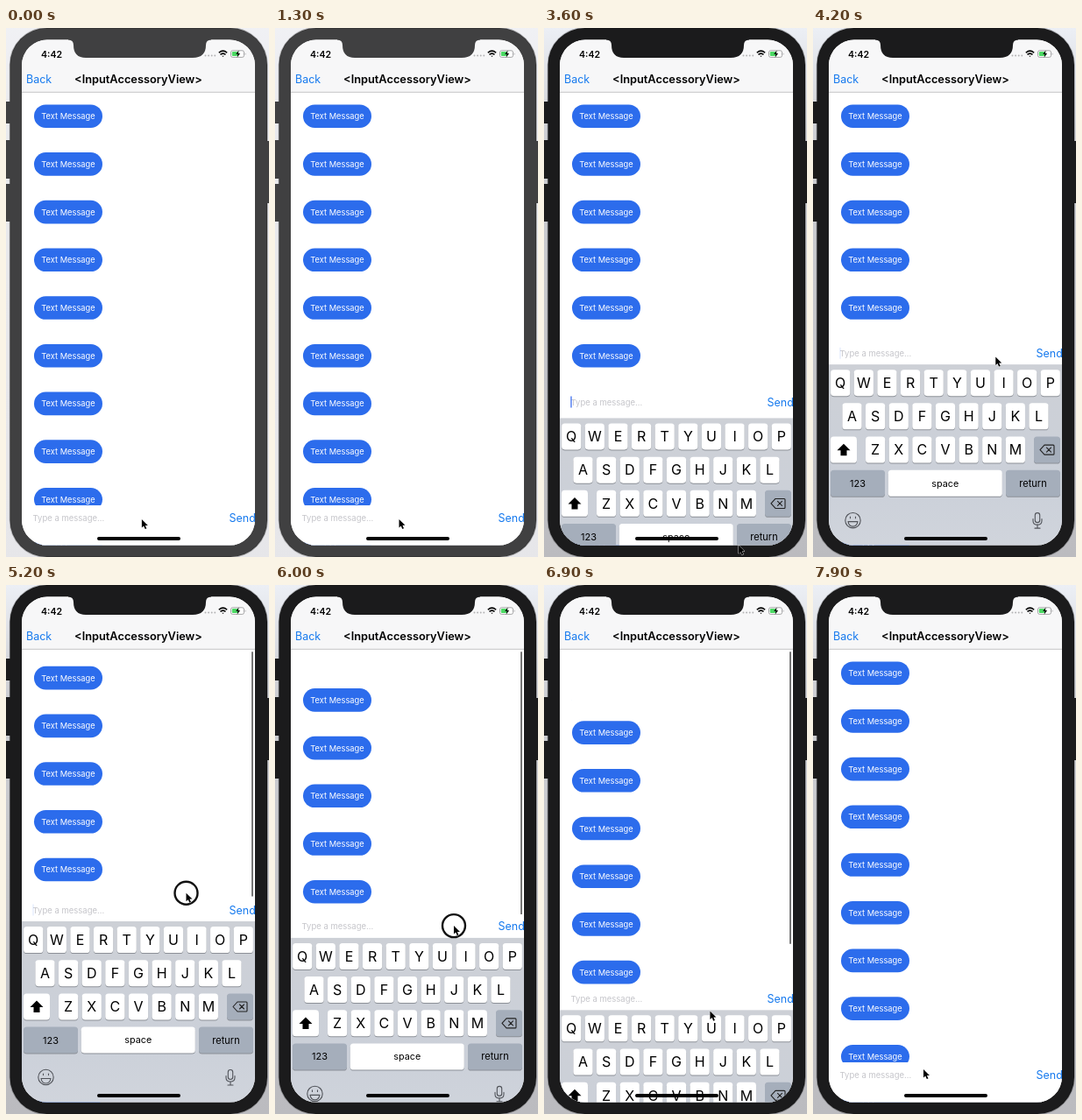
These frames come from a looping animation (300x604 px, 8 s). An HTML page:

```html
<!DOCTYPE html>
<html lang="en">
<head>
<meta charset="utf-8">
<title>Input accessory view</title>
<style>
  html, body { margin: 0; width: 100%; height: 100%; overflow: hidden; background: #eee; }
  svg { display: block; width: 300px; height: 604px; font-family: Inter, sans-serif; }
  .mid { text-anchor: middle; }
  .blue { fill: #1579ee; font-size: 12.5px; }
  .bold { font-weight: 600; }
  .line { fill: none; stroke: #505359; stroke-width: 1.1; stroke-linecap: round; stroke-linejoin: round; }
</style>
</head>
<body>
<svg viewBox="0 0 300 604">
  <defs>
    <clipPath id="screen"><rect x="18" y="13.6" width="266" height="577" rx="29"/></clipPath>
    <linearGradient id="shade" x2="0" y2="1">
      <stop stop-color="#eceff5"/><stop offset=".2" stop-color="#cfd0d4"/><stop offset="1" stop-color="#bbbbbf"/>
    </linearGradient>
    <linearGradient id="board" x2="0" y2="1">
      <stop stop-color="#cdd0d6"/><stop offset=".6" stop-color="#cbd0d9"/><stop offset="1" stop-color="#d2d6dd"/>
    </linearGradient>
  </defs>
  <rect width="300" height="604" fill="#f1f1f4"/>
  <rect id="shadow" width="300" height="604" fill="url(#shade)"/>
  <g id="phone">
    <rect x="4.5" width="293.5" height="604" rx="42" stroke="#000" stroke-opacity=".25" stroke-width="1.5"/>
    <path d="M0 84h6v25H0zM0 128h6v44H0zM0 178h6v43H0zM296 129h4v71h-4z"/>
  </g>
  <g clip-path="url(#screen)">
    <rect x="18" y="13" width="266" height="578" fill="#fff"/>
    <g id="messages"></g>
    <rect id="scrollbar" x="280" y="76" width="2" rx="1" fill="#757575"/>
    <path d="M18 13h266v60H18z" fill="#f7f7f8"/>
    <path d="M18 73.3h266" stroke="#b5b5b8" stroke-width=".8"/>
    <g id="bar">
      <path d="M18-14h266v90H18z" fill="#fff"/>
      <text x="30.5" y="3.5" font-size="9.5" fill="#c5c5ca">Type a message...</text>
      <text x="254.5" y="4.5" class="blue">Send</text>
      <path id="caret" d="M31-6.5V6.5" stroke="#3d6ff0" stroke-width="1.3"/>
    </g>
    <g id="keyboard">
      <rect x="18" width="266" height="230" fill="url(#board)"/>
    </g>
    <text x="23" y="63" class="blue">Back</text>
    <text x="151" y="63" class="mid bold" font-size="12.8">&lt;InputAccessoryView&gt;</text>
    <text x="40" y="33.5" class="bold" font-size="10.6">4:42</text>
    <path d="M227.5 31.5h12" stroke="#b4b4b6" stroke-width="2" stroke-linecap="round" stroke-dasharray="0 3.6"/>
    <path d="M242.8 28.2q4.7-4.2 9.4 0M244.5 30.4q3-2.6 6 0" fill="none" stroke="#000" stroke-width="1.5"/>
    <path d="M246.3 31.8h2.4l-1.2 1.3z"/>
    <rect x="256.5" y="25.8" width="15" height="7.6" rx="2" fill="#fff" stroke="#8e8e90" stroke-width=".8"/>
    <rect x="257.8" y="27.1" width="7.5" height="5" rx="1" fill="#4cd964"/>
    <path d="M272.8 28.2q1.6 1.4 0 2.8z" fill="#8e8e90"/>
    <path d="M265.5 25.5l-3.3 4.6h2.2l-.8 3.6 3.5-4.7h-2.2z"/>
  </g>
  <path id="notch" d="M71 12v1.6q6 0 6 6 0 14.4 14 14.4h122q15 0 15-14.4 0-6 6-6V12z"/>
  <path d="M106 583h91" stroke="#000" stroke-width="4" stroke-linecap="round"/>
  <g id="pointer">
    <circle id="touch" r="13" fill="#fff" fill-opacity=".4" stroke="#111" stroke-width="2.4"/>
    <path d="M0 0v9.5l2.2-2 1.6 3.6 1.7-.7-1.6-3.5h3.1z" stroke="#fff" stroke-width=".8" paint-order="stroke"/>
  </g>
</svg>
<script>
const $ = id => document.getElementById(id);
const add = (id, markup) => $(id).insertAdjacentHTML('beforeend', markup);
const set = (id, name, value) => $(id).setAttribute(name, value);
const move = (id, x, y) => set(id, 'transform', `translate(${x} ${y})`);
const clamp = v => Math.max(0, Math.min(1, v));
const ramp = (t, from, to) => clamp((t - from) / (to - from));
const ease = (t, from, to) => (1 - Math.cos(Math.PI * ramp(t, from, to))) / 2;

for (let i = 0; i < 10; i++) {
  const y = 100.7 + i * 54.7;
  add('messages', `<rect x="32" y="${y - 13.3}" width="78" height="26.6" rx="13.3" fill="#2c6cec"/>
    <text x="71" y="${y + 3.5}" class="mid" font-size="9.3" fill="#fff">Text Message</text>`);
}

function addKey(x, row, width, label = '', size = 16, fill = '#fff') {
  const y = 21 + row * 38.2;
  add('keyboard', `<rect x="${x - width / 2}" y="${y - 14}" width="${width}" height="30" rx="3.6" fill="#8c9097"/>
    <rect x="${x - width / 2}" y="${y - 15}" width="${width}" height="30" rx="3.6" fill="${fill}"/>
    <text x="${x}" y="${y + size * .36}" class="mid" font-size="${size}">${label}</text>`);
}
const grey = '#a5aebb', pitch = 26.62;
['QWERTYUIOP', 'ASDFGHJKL', 'ZXCVBNM'].forEach((keys, row) =>
  [...keys].forEach((key, i) => addKey(151 + (i - (keys.length - 1) / 2) * pitch, row, 22.2, key)));
addKey(35, 2, 30);
addKey(267, 2, 30, '', 11, grey);
addKey(51, 3, 62, '123', 11, grey);
addKey(150.8, 3, 130, 'space', 10.8);
addKey(251, 3, 62, 'return', 11, grey);
add('keyboard', `
  <path d="M35 90.5l7.5 7.5h-4v6h-7v-6h-4z"/>
  <g class="line">
    <path stroke="#222" d="M259 97.5l5-5.5h10q1 0 1 1v9q0 1-1 1h-10zM266.5 95l5 5M271.5 95l-5 5"/>
    <circle cx="45.5" cy="178" r="8.7"/>
    <path d="M40 179.5h11q-1 5.5-5.5 5.5t-5.5-5.5M42.5 174v1.6M48.5 174v1.6"/>
    <rect x="253.3" y="169.5" width="5.4" height="11" rx="2.7"/>
    <path d="M251 176.5v2q0 4.5 5 4.5t5-4.5v-2M256 183v4M253 187h6"/>
  </g>`);

// Pointer stops: time, x, y
const stops = [[0, 155, 561], [800, 58, 563], [2000, 258, 558], [2600, 246, 551], [3600, 222, 591],
  [4300, 206, 340], [4950, 206, 340], [6000, 204, 389], [6900, 189.5, 486.5], [7900, 126, 553]];

function pointerAt(t) {
  const next = stops.findIndex(stop => stop[0] > t);
  if (next < 0) return stops.at(-1).slice(1);
  const [t0, x0, y0] = stops[next - 1], [t1, x1, y1] = stops[next];
  const f = ramp(t, t0, t1);
  return [x0 + (x1 - x0) * f, y0 + (y1 - y0) * f];
}

function draw(now) {
  const t = now % 8000;
  const body = t < 3000 ? '#404041' : '#1b1b1c';

  // The keyboard rises exponentially, then follows the drag down
  const hidden = Math.exp(-Math.max(0, t - 3480) / 100);
  const drag = Math.min(206, 31 * Math.max(0, t / 1000 - 5.2) ** 2.23);
  const pull = 27 * Math.max(0, t / 1000 - 4.9) ** 1.33 * (1 - ease(t, 6900, 7350));
  const blink = clamp(.5 - 1.2 * Math.cos(t * Math.PI / 500));

  set('shadow', 'opacity', .2 + .8 * ramp(t, 2950, 3200));
  set('phone', 'fill', body);
  set('notch', 'fill', body);
  move('messages', 0, pull);
  move('keyboard', 0, 384 + 206 * hidden + drag);
  move('bar', 0, Math.min(559, 371 + 188 * hidden + drag));
  set('caret', 'opacity', t > 3480 && t < 7000 ? blink : 0);
  set('scrollbar', 'height', 275 + .87 * pull);
  set('scrollbar', 'opacity', ramp(t, 4900, 5000) - ramp(t, 7000, 7300));
  move('pointer', ...pointerAt(t));
  set('touch', 'opacity', +(t >= 4800 && t < 6800));
  requestAnimationFrame(draw);
}
requestAnimationFrame(draw);
</script>
</body>
</html>
```
